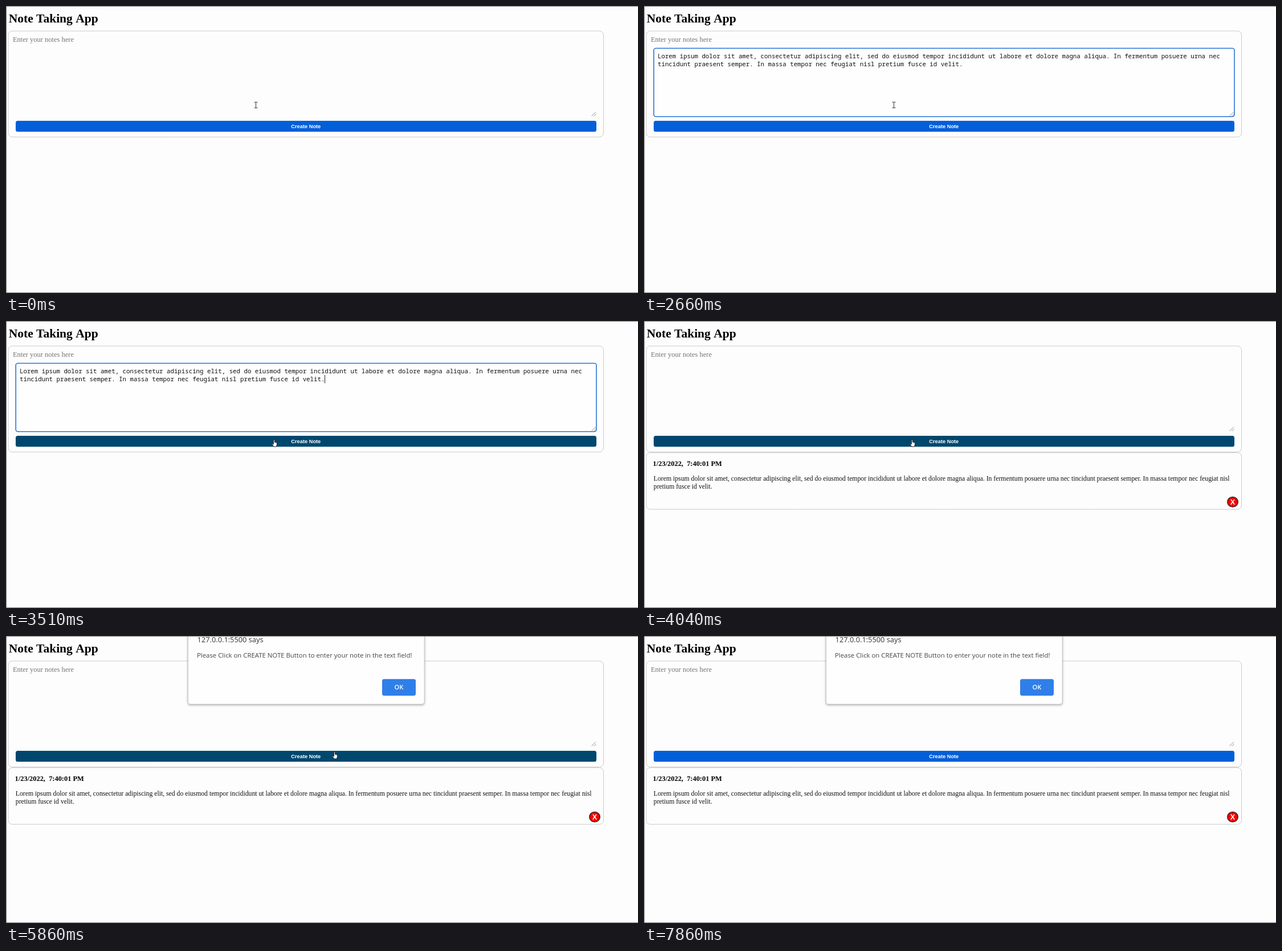
These frames come from a looping animation (1109x505 px, 8000 ms). An HTML page with a canvas:

```html
<!DOCTYPE html>
<html lang="en">
<head>
<meta charset="utf-8">
<title>Note Taking App</title>
<style>
  html, body { margin: 0; width: 100%; height: 100%; overflow: hidden; background: #fdfdfd; }
  canvas { display: block; }
</style>
</head>
<body>
<canvas id="stage" width="1109" height="505"></canvas>
<script>
const ctx = document.getElementById('stage').getContext('2d');
const LOOP = 8000;
const SERIF = '"Liberation Serif", serif';
const SANS = '"Liberation Sans", sans-serif';
const MONO = '"Noto Sans Mono", monospace';
const UI = '"Open Sans", sans-serif';
const BLUE = '#035fd8', MID = '#02539f', DARK = '#00476e';

const TYPED = [
  'Lorem ipsum dolor sit amet, consectetur adipiscing elit, sed do eiusmod tempor incididunt ut labore et dolore magna aliqua. In fermentum posuere urna nec',
  'tincidunt praesent semper. In massa tempor nec feugiat nisl pretium fusce id velit.'
];
const SAVED = [
  'Lorem ipsum dolor sit amet, consectetur adipiscing elit, sed do eiusmod tempor incididunt ut labore et dolore magna aliqua. In fermentum posuere urna nec tincidunt praesent semper. In massa tempor nec feugiat nisl',
  'pretium fusce id velit.'
];

// Each entry: start time, then the value held until the next one.
const CURSOR = [
  [0, 'beam', 438, 174], [3070, 'arrow', 487.5, 248], [3220, 'arrow', 486, 251],
  [3340, 'hand', 471, 209], [4350, 'hand', 474, 211], [4500, 'hand', 492, 215],
  [4620, 'hand', 515, 217], [4770, 'beam', 552, 134], [4890, 'beam', 556, 130],
  [5010, 'beam', 566, 146], [5130, 'beam', 578, 181], [5280, 'hand', 577, 204],
  [6160, 'arrow', 606, 138], [6290, 'arrow', 629, 86], [6430, 'arrow', 685, 80],
  [6570, 'arrow', 696.5, 94], [7860, 'none', 0, 0]
];
const BUTTON = [
  [0, BLUE], [3070, DARK], [3220, MID], [3510, DARK], [4770, BLUE],
  [5430, DARK], [7740, MID], [7860, BLUE]
];
const CARET = [
  [0, 0], [430, 1], [1020, 0], [1550, 1], [2010, 0], [2130, 1],
  [2660, 0], [3220, 1], [3800, 0]
];

const at = (track, t) => track.filter(k => k[0] <= t).pop();
const within = (t, from, to) => t >= from && t < to;

function text(str, x, y, font, color, align = 'left') {
  ctx.font = font;
  ctx.fillStyle = color;
  ctx.textAlign = align;
  ctx.fillText(str, x, y);
}

function box(x, y, w, h, r, fill, stroke, line = 1) {
  ctx.beginPath();
  ctx.roundRect(x, y, w, h, r);
  if (fill) { ctx.fillStyle = fill; ctx.fill(); }
  if (stroke) { ctx.strokeStyle = stroke; ctx.lineWidth = line; ctx.stroke(); }
}

function lines(points, color, width) {
  ctx.beginPath();
  for (const [x1, y1, x2, y2] of points) {
    ctx.moveTo(x1, y1);
    ctx.lineTo(x2, y2);
  }
  ctx.strokeStyle = color;
  ctx.lineWidth = width;
  ctx.stroke();
}

function drawPage() {
  ctx.fillStyle = '#fdfdfd';
  ctx.fillRect(0, 0, 1109, 505);
  ctx.fillStyle = '#777';
  ctx.fillRect(0, 0, 1109, 1);
  ctx.fillRect(0, 0, 1, 505);
  ctx.fillRect(0, 504, 1109, 1);
  text('Note Taking App', 4.7, 29, `bold 21.5px ${SERIF}`, '#000');
  box(4, 44, 1044.5, 186.5, 7, null, '#cbcbcb');
  text('Enter your notes here', 12, 63, `12.48px ${SERIF}`, '#757575');
}

function drawField(t) {
  const typed = within(t, 2130, 3920);
  if (within(t, 430, 3800)) box(17.2, 74.4, 1018.8, 120.2, 3.5, '#fefefe', '#0a61cb', 1.4);
  lines([[1027.5, 193.5, 1035, 186.5], [1031.5, 194, 1035.5, 190]], '#777', 0.8);
  if (typed) TYPED.forEach((s, i) => text(s, 24, 92.3 + 14 * i, `10.75px ${MONO}`, '#111'));
  if (at(CARET, t)[1]) {
    ctx.fillStyle = '#222';
    ctx.fillRect(typed ? 559 : 24, typed ? 95 : 81, 1, 14.5);
  }
  box(17, 202, 1019, 19.3, 3.5, at(BUTTON, t)[1]);
  text('Create Note', 526.3, 215.2, `bold 9.25px ${SANS}`, '#fff', 'center');
}

function drawNote() {
  box(4, 231.7, 1044.5, 99.6, 7, null, '#cbcbcb');
  text('1/23/2022, \u00a07:40:01 PM', 15.6, 255, `bold 12.4px ${SERIF}`, '#000');
  SAVED.forEach((s, i) => text(s, 16.8, 281 + 13.6 * i, `11.73px ${SERIF}`, '#111'));
  box(1023.7, 309.6, 18.6, 17.6, 9, '#f50000', '#222', 1.3);
  text('X', 1033, 322.6, `bold 12.5px ${SANS}`, '#fff', 'center');
}

function drawDialog(t) {
  const raised = t < 6010 || t >= 7860;
  const dx = raised ? 0.6 : 0;
  ctx.save();
  if (raised) ctx.translate(0, -6);
  ctx.shadowColor = 'rgba(0,0,0,.35)';
  ctx.shadowBlur = 4;
  ctx.shadowOffsetY = 1.5;
  box(320 - dx, -10, 413.5 + 2 * dx, 136, 4, '#fefefe');
  ctx.shadowColor = 'transparent';
  box(320 - dx, -10, 413.5 + 2 * dx, 136, 4, null, '#bbb', 0.8);
  text('127.0.0.1:5500 says', 335 + dx, 17.4, `12.8px ${UI}`, '#333');
  text('Please Click on CREATE NOTE Button to enter your note in the text field!',
    335, 43.5, `11.38px ${UI}`, '#444');
  const fill = within(t, 6010, 6840) ? '#1f74e6' : '#307fe8';
  if (raised) {
    box(660, 81.7, 59, 29.3, 3.5, fill);
  } else {
    box(659.2, 81.7, 59, 29, 3.5, '#fff', '#3c82e2', 1.5);
    box(661, 83.4, 55.4, 25.6, 2, fill);
  }
  text('OK', 688.8 + dx, 100.3, `600 11px ${UI}`, '#fff', 'center');
  ctx.restore();
  // Keep the page's top edge visible over the dialog.
  ctx.fillStyle = '#777';
  ctx.fillRect(0, 0, 1109, 1);
}

const POINTERS = {
  beam() {
    lines([[0.5, -4.5, 0.5, 5], [-2.5, -4.8, 3.5, -4.8], [-2.5, 5.2, 3.5, 5.2]], '#333', 1);
  },
  arrow() {
    outline('M0 0 V9.6 L2.2 7.6 L3.8 11.3 L5.4 10.6 L3.9 7.1 H6.8 Z');
  },
  hand() {
    outline('M-1.6 0.8 Q-.6-.6 .3 .8 V4.2 Q3.9 4 4.4 6 V8.6 L3.4 12 H-1.2 L-4.2 7.6 Q-4-.0 -1.6 8 Z'
      .replace('Q-4-.0 -1.6 8', 'Q-3.6 6 -1.6 8'));
  }
};

function outline(d) {
  const path = new Path2D(d);
  ctx.lineJoin = 'round';
  ctx.lineWidth = 0.9;
  ctx.fillStyle = '#fff';
  ctx.strokeStyle = '#222';
  ctx.fill(path);
  ctx.stroke(path);
}

function drawCursor(t) {
  const [, kind, x, y] = at(CURSOR, t);
  if (kind === 'none') return;
  ctx.save();
  ctx.translate(x, y);
  POINTERS[kind]();
  ctx.restore();
}

function render(t) {
  drawPage();
  drawField(t);
  if (t >= 3920) drawNote();
  if (t >= 5860) drawDialog(t);
  drawCursor(t);
}

const start = performance.now();
function tick() {
  render((performance.now() - start) % LOOP);
  requestAnimationFrame(tick);
}
tick();
</script>
</body>
</html>
```
